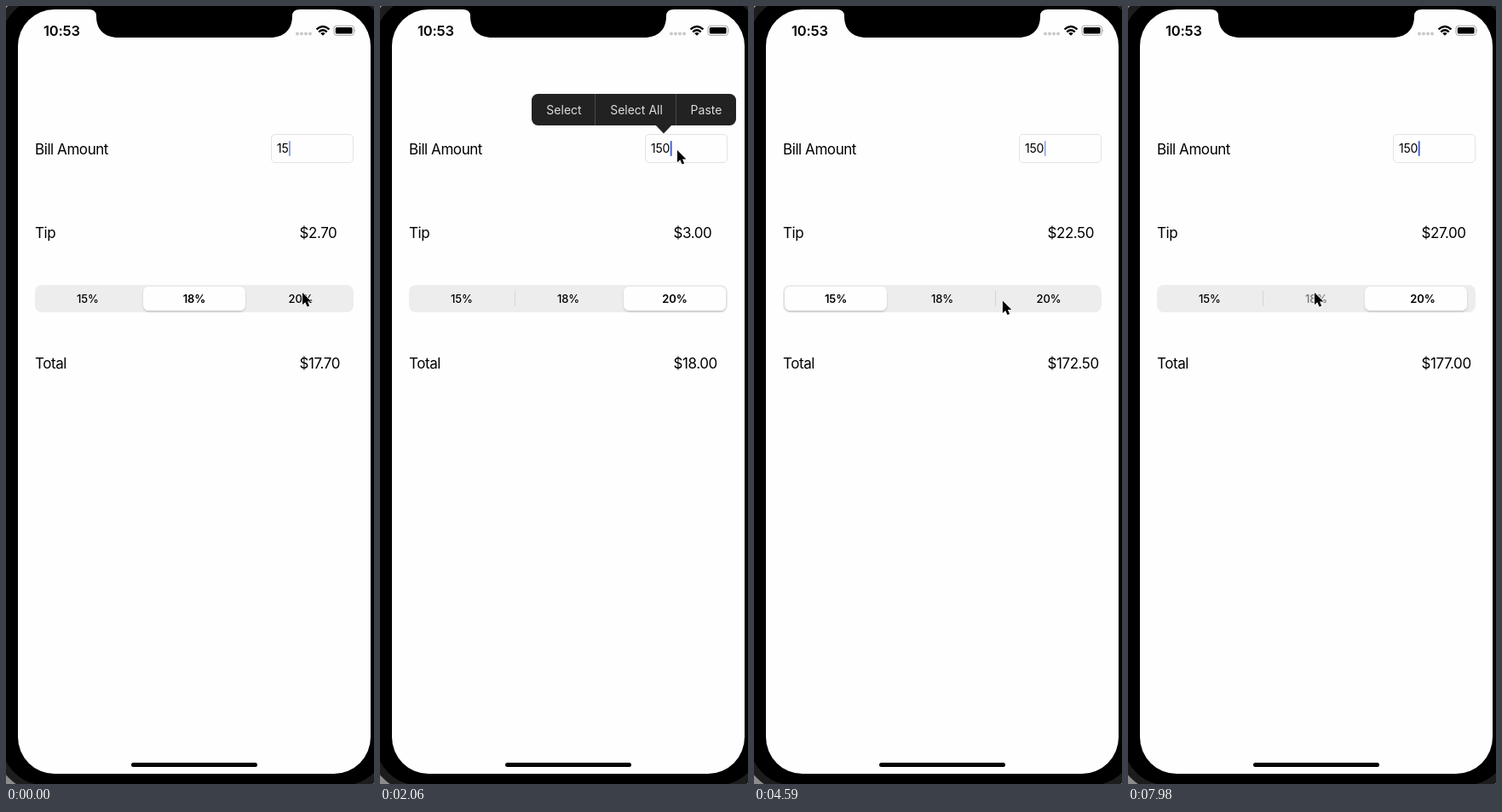
These frames come from a looping animation (432x912 px, 8000 ms). An HTML page:

```html
<!DOCTYPE html>
<html lang="en">
<head>
<meta charset="utf-8">
<title>Tip calculator</title>
<style>
  html, body { margin: 0; width: 100%; height: 100%; overflow: hidden; background: #8c8c8c; }
  svg { display: block; width: 432px; height: 912px; }
  text { font: 17px Inter, "Open Sans", sans-serif; letter-spacing: -.43px; }
  .time { font-weight: 600; font-size: 16.5px; letter-spacing: -.2px; }
  .field { font-size: 14px; letter-spacing: -.3px; }
  .segment { font-size: 13px; font-weight: 500; letter-spacing: -.1px; text-anchor: middle; }
  .menu { font-size: 14px; letter-spacing: 0; text-anchor: middle; fill: #dcdcdc; }
</style>
</head>
<body>
<svg viewBox="0 0 432 912">
  <defs>
    <filter id="soft" x="-20%" y="-40%" width="140%" height="200%">
      <feDropShadow dx="0" dy="1.5" stdDeviation="1.2" flood-opacity=".18"/>
    </filter>
  </defs>

  <!-- phone -->
  <rect x="-10" y="-14" width="462" height="932" rx="56" stroke="#1d1d1d" stroke-width="9"/>
  <rect x="14" y="4" width="414" height="896" rx="43" fill="#fefefe"/>
  <path d="M97 3V4Q106 4 106 12C106 28 116 37 132 37H310C326 37 336 28 336 12Q336 4 345 4V3Z"/>
  <rect x="147" y="887" width="148" height="5" rx="2.5"/>

  <!-- status bar -->
  <text class="time" x="44" y="34.5">10:53</text>
  <g fill="#c9c9cb">
    <circle cx="342" cy="32.5" r="2"/><circle cx="347" cy="32.5" r="2"/>
    <circle cx="352" cy="32.5" r="2"/><circle cx="357" cy="32.5" r="2"/>
  </g>
  <g fill="none" stroke="#000" stroke-width="2.3">
    <path d="M364.5 27.3Q372 20.7 379.5 27.3M367.2 30.3Q372 26.3 376.8 30.3"/>
  </g>
  <path d="M369.2 32Q372 29.8 374.8 32L372 34.8Z"/>
  <rect x="385" y="23.2" width="23.5" height="11.2" rx="3" fill="none" stroke="#a5a5a5"/>
  <rect x="386.8" y="25" width="19.8" height="7.6" rx="1.6"/>
  <path d="M409.7 27Q411.3 28.8 409.7 30.6Z" fill="#a5a5a5"/>

  <!-- form -->
  <text x="34" y="173.5">Bill Amount</text>
  <text x="34" y="271.5">Tip</text>
  <text x="34" y="424.5">Total</text>
  <text id="tip" x="344.5" y="271.5"></text>
  <text id="total" x="344.5" y="424.5"></text>
  <rect x="311.5" y="150.5" width="96" height="33" rx="4.5" fill="#fefefe" stroke="#e3e3e4"/>
  <text id="bill" class="field" x="318" y="172"></text>
  <rect id="caret" y="158" width="2" height="18" rx="1" fill="#4264d9"/>

  <!-- segmented control -->
  <rect x="34" y="327" width="374" height="32" rx="8" fill="#ededed"/>
  <rect class="divider" x="158" y="334" width="1" height="18" fill="#d5d5d7"/>
  <rect class="divider" x="283" y="334" width="1" height="18" fill="#d5d5d7"/>
  <rect id="thumb" y="329" width="120" height="28" rx="6.5" fill="#fefefe" filter="url(#soft)"/>
  <text class="segment" x="96" y="347.5">15%</text>
  <text class="segment" x="221" y="347.5">18%</text>
  <text class="segment" x="346" y="347.5">20%</text>

  <!-- edit menu -->
  <g id="menu">
    <path d="M323 139H343L333 149.5Z" fill="#222"/>
    <rect x="178" y="103" width="240" height="37" rx="7.5" fill="#222"/>
    <path d="M252.5 103V140M347.5 103V140" stroke="#484848"/>
    <text class="menu" x="216" y="126.5">Select</text>
    <text class="menu" x="301" y="126.5">Select All</text>
    <text class="menu" x="383" y="126.5">Paste</text>
  </g>

  <path id="pointer" d="M0 0V14.3L3.3 11.3 5.6 16.5 8.2 15.4 6 10.4H10.4Z"
        stroke="#fff" stroke-width="1.4" paint-order="stroke" stroke-linejoin="round"/>
</svg>
<script>
const LOOP = 8000, STEP = 147.8, TYPED_AT = 1960, SLIDE = 500;
const RATES = [.15, .18, .2];

// [time, selected segment]
const TAPS = [[-2000, 1], [235, 2], [2750, 1], [3830, 0], [4760, 2], [7854, 1]];

// [time, x, y] of the pointer tip
const PATH = [
  [0, 348, 336], [150, 348, 336], [591, 351, 357], [900, 353, 338], [1180, 358, 300],
  [1500, 350, 172], [2070, 349, 169], [2360, 157, 308], [2720, 205, 345], [3050, 190, 417],
  [3400, 122, 385], [3695, 138, 340], [3850, 100, 342], [4150, 98, 350], [4700, 318, 345],
  [5320, 308, 351], [5910, 352, 215], [6350, 350, 180], [6640, 344, 166], [7095, 344, 166],
  [7800, 219, 338], [7980, 219, 336]
];

const $ = id => document.getElementById(id);
const segments = [...document.querySelectorAll(".segment")];
const dividers = [...document.querySelectorAll(".divider")];
const clamp = v => Math.min(1, Math.max(0, v));
const ramp = (t, from, to) => clamp((t - from) / (to - from));
const mix = (a, b, p) => a + (b - a) * p;
const smooth = p => p * p * (3 - 2 * p);
const easeInOut = p => p < .5 ? 4 * p ** 3 : 1 - 4 * (1 - p) ** 3;
const money = v => "$" + v.toFixed(2);

function pointerAt(t) {
  const i = Math.max(1, PATH.findIndex(key => key[0] >= t));
  const [t0, x0, y0] = PATH[i - 1], [t1, x1, y1] = PATH[i];
  const p = smooth(ramp(t, t0, t1));
  return [mix(x0, x1, p), mix(y0, y1, p)];
}

function caretOpacity(t) {
  const phase = ((t - (t < TYPED_AT ? 50 : TYPED_AT) + 1000) % 1000) / 1000;
  return phase < .8 ? 1 - ramp(phase, .56, .69) : ramp(phase, .88, 1);
}

function drawControl(t) {
  const last = TAPS.findLastIndex(tap => tap[0] <= t);
  const [tapTime, selected] = TAPS[last];
  const previous = last ? TAPS[last - 1][1] : selected;
  const age = t - tapTime;

  const slide = easeInOut(clamp(age / SLIDE));
  $("thumb").setAttribute("x", 36 + 125 * mix(previous, selected, slide));

  const bold = age > 200 ? selected : previous;
  segments.forEach((label, i) => {
    const pressed = TAPS.some(([time, target]) => target === i && Math.abs(t - time) < 150);
    label.style.fontWeight = i === bold ? 600 : 500;
    label.style.opacity = pressed ? .5 : 1;
  });

  const shown = (i, segment) => segment === i || segment === i + 1 ? 0 : 1;
  dividers.forEach((line, i) => {
    line.style.opacity = mix(shown(i, previous), shown(i, selected), ramp(age, 200, 450));
  });

  const bill = tapTime < TYPED_AT ? 15 : 150;
  const tip = bill * RATES[selected];
  $("tip").textContent = money(tip);
  $("total").textContent = money(bill + tip);
}

function draw(t) {
  const typed = t >= TYPED_AT;
  $("bill").textContent = typed ? "150" : "15";
  $("caret").setAttribute("x", typed ? 340.7 : 332);
  $("caret").style.opacity = caretOpacity(t);
  $("menu").style.opacity = ramp(t, 1550, 1700) - ramp(t, 2080, 2200);
  $("pointer").setAttribute("transform", `translate(${pointerAt(t)})`);
  drawControl(t);
}

const start = performance.now();
function tick() {
  const t = (performance.now() - start) % LOOP;
  draw(Math.min(7980, Math.floor((t + 10) / STEP) * STEP));
  requestAnimationFrame(tick);
}
tick();
</script>
</body>
</html>
```
